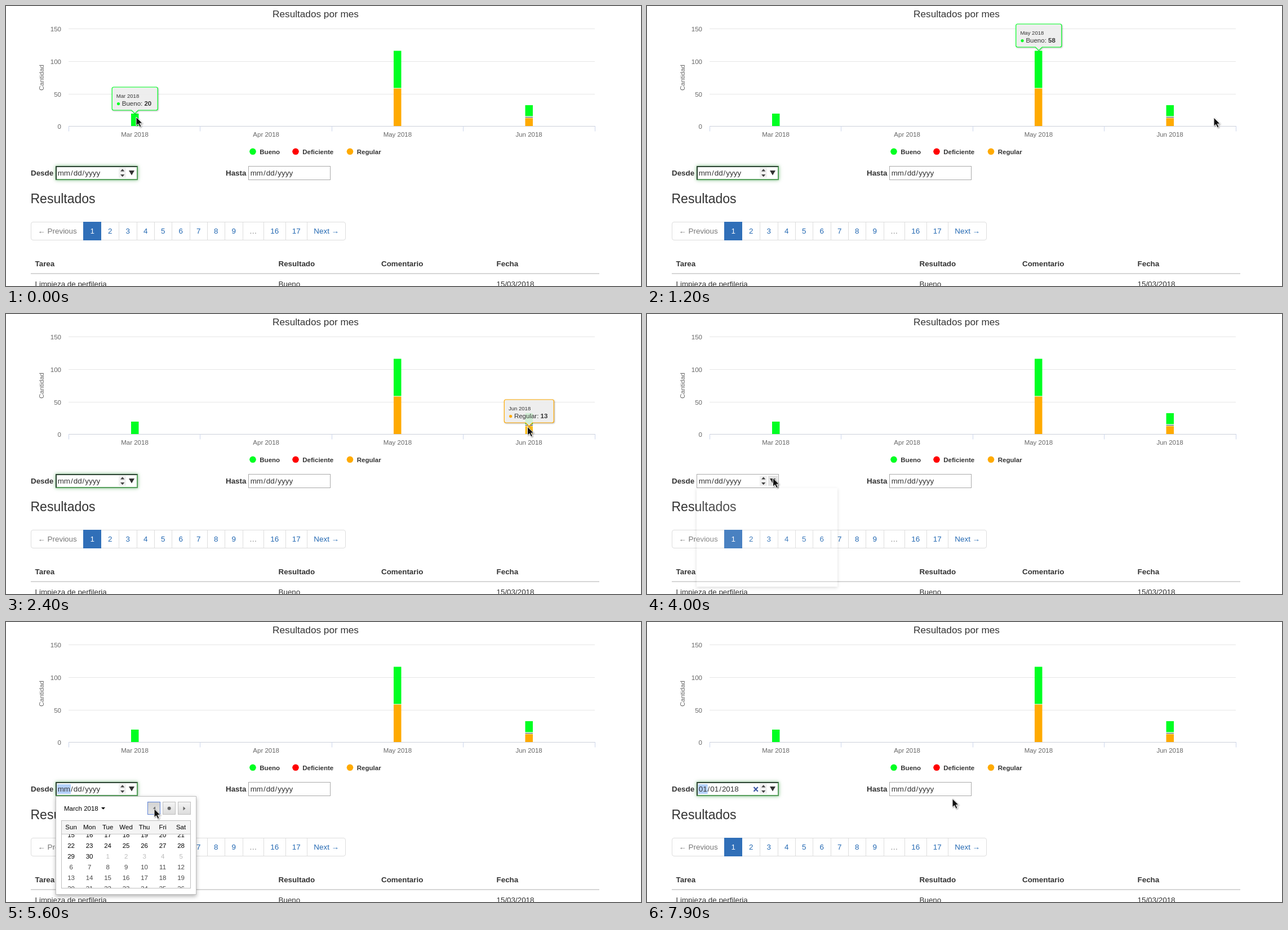
An HTML page for the animation above (8 s loop, 1127 by 497 pixels).

```html
<!DOCTYPE html>
<html lang="es">
<head>
<meta charset="utf-8">
<title>Resultados por mes</title>
<style>
html, body { margin: 0; width: 100%; height: 100%; overflow: hidden; background: #fff; }
svg { position: absolute; left: 0; top: 0; font-family: "Liberation Sans", Arial, sans-serif; }
text { white-space: pre; }
.box { position: absolute; box-sizing: border-box; background: #fff; }
.field { top: 284px; width: 146px; height: 25px; border: 1px solid #a9a9a9; }
.field.on {
  border: 2px solid; border-color: #2c4433 #58a05e #58a05e #2c4433;
  box-shadow: 0 0 6px rgba(50, 150, 60, .65);
}
#pop {
  left: 88px; top: 309px; width: 250px; height: 175px;
  border: 1px solid #bfbfbf; box-shadow: 0 3px 7px rgba(0, 0, 0, .3);
}
#pop.faint { background: rgba(255, 255, 255, .12); border-color: transparent; box-shadow: 0 2px 6px rgba(0, 0, 0, .14); }
#tip { filter: drop-shadow(1px 1px 1px rgba(0, 0, 0, .3)); }
#arrow, #hand { filter: drop-shadow(1px 1px 1px rgba(0, 0, 0, .4)); }
</style>
</head>
<body>
<svg id="page" width="1127" height="497"></svg>
<div class="box field" id="desde" style="left:88px"></div>
<div class="box field" style="left:430px"></div>
<svg id="inputs" width="1127" height="497"></svg>
<div class="box" id="pop"></div>
<svg id="cal" width="1127" height="497">
  <defs>
    <linearGradient id="up" x2="0" y2="1"><stop stop-color="#f4f4f4"/><stop offset="1" stop-color="#dcdcdc"/></linearGradient>
    <linearGradient id="down" x2="0" y2="1"><stop stop-color="#d2d2d2"/><stop offset="1" stop-color="#e6e6e6"/></linearGradient>
    <clipPath id="days"><rect x="99" y="377" width="228" height="95"/></clipPath>
  </defs>
  <g id="calBody"></g>
</svg>
<svg id="top" width="1127" height="497">
  <g id="tip"></g>
  <path id="arrow" d="M0 0V15.4L3.6 12.2L6.3 18L9 16.8L6.4 11.2H11.2Z" fill="#111" stroke="#fff" stroke-width="1" stroke-linejoin="round"/>
  <path id="hand" d="M-1.5 1Q0 -1 1.5 1V8Q3 6.8 4.3 8Q5.8 7 7 8.6Q9.4 8.2 9.4 10.5V15Q9 18 7.5 21H-2Q-3 18.5 -7 13.5Q-8.4 11 -6 10.8Q-4 11.2 -1.5 14Z" fill="#111" stroke="#fff" stroke-linejoin="round"/>
</svg>
<script>
const LOOP = 8000, STEP = 100;
const SMALL = 11.5, BODY = 13.4;
const GREEN = '#00ff22', RED = '#ff0000', ORANGE = '#ffaa00', LINK = '#2469b3';
const $ = id => document.getElementById(id);

function add(parent, tag, attrs, content) {
  const el = document.createElementNS('http://www.w3.org/2000/svg', tag);
  for (const k in attrs) el.setAttribute(k, attrs[k]);
  if (content !== undefined) el.textContent = content;
  return parent.appendChild(el);
}
const rect = (p, x, y, width, height, fill, more) => add(p, 'rect', { x, y, width, height, fill, ...more });
const line = (p, d, stroke, w = 1) => add(p, 'path', { d, stroke, 'stroke-width': w, fill: 'none' });
const shape = (p, d, fill) => add(p, 'path', { d, fill });
const dot = (p, cx, cy, r, fill) => add(p, 'circle', { cx, cy, r, fill });
const text = (p, x, y, s, size = BODY, fill = '#333', more) =>
  add(p, 'text', { x, y, 'font-size': size, fill, ...more }, s);
const MID = { 'text-anchor': 'middle' }, END = { 'text-anchor': 'end' }, BOLD = { 'font-weight': 'bold' };

function drawChart(g) {
  text(g, 549.5, 20, 'Resultados por mes', 17.2, '#333', MID);
  [150, 100, 50, 0].forEach((v, i) => {
    const y = [40.5, 98.5, 156.5, 213.5][i];
    if (v) line(g, `M111 ${y}H1045`, '#e6e6e6');
    text(g, 98, y + 4.3, v, SMALL, '#666', END);
  });
  text(g, 0, 0, 'Cantidad', SMALL, '#666', { ...MID, transform: 'translate(67 127) rotate(-90)' });
  rect(g, 222, 191, 13.5, 22.5, GREEN);
  rect(g, 688, 79.5, 13.5, 66, GREEN);
  rect(g, 688, 146.5, 13.5, 67, ORANGE);
  rect(g, 921.5, 176, 13.5, 19.5, GREEN);
  rect(g, 921.5, 197, 13.5, 1, '#444');
  rect(g, 921.5, 199, 13.5, 14.5, ORANGE, { id: 'regular' });
  line(g, 'M111 213.5H1045', '#ccd0da');
  for (let i = 0; i < 5; i++) line(g, `M${Math.round(111 + i * 233.4) + .5} 213V222.5`, '#ccd6eb');
  ['Mar', 'Apr', 'May', 'Jun'].forEach((m, i) =>
    text(g, 228.5 + i * 233.2, 232.3, m + ' 2018', SMALL, '#666', MID));
  [[438, 'Bueno', GREEN], [514, 'Deficiente', RED], [610.5, 'Regular', ORANGE]].forEach(([x, s, c]) => {
    dot(g, x, 258.3, 5.8, c);
    text(g, x + 12.3, 262.7, s, SMALL, '#333', BOLD);
  });
}

function drawTable(g) {
  text(g, 44, 301, 'Desde', BODY, '#333', BOLD);
  text(g, 390, 301, 'Hasta', BODY, '#333', BOLD);
  text(g, 43.5, 350, 'Resultados', 23, '#333');
  rect(g, 44.5, 383.5, 558, 32, '#fff', { rx: 3.5, stroke: '#ddd' });
  const edges = [137, 169, 200, 232, 263, 294, 326, 357, 388, 420, 457, 496, 534, 603];
  const labels = ['1', '2', '3', '4', '5', '6', '7', '8', '9', '…', '16', '17', 'Next →'];
  text(g, 56.5, 404.3, '← Previous', BODY, '#777');
  labels.forEach((s, i) => {
    const x = edges[i];
    if (!i) rect(g, x, 383, 32, 33, '#306fb8');
    else if (i > 1) line(g, `M${x + .5} 384V415`, '#ddd');
    text(g, (x + edges[i + 1]) / 2 + .2, 404.3, s, BODY, !i ? '#fff' : s === '…' ? '#777' : LINK, MID);
  });
  [[51.5, 'Tarea', 'Limpieza de perfileria'], [483.5, 'Resultado', 'Bueno'], [666, 'Comentario', ''], [870.5, 'Fecha', '15/03/2018']]
    .forEach(([x, head, cell]) => {
      text(g, x, 462, head, BODY, '#333', BOLD);
      text(g, x, 498, cell);
    });
  line(g, 'M44 475H1053', '#d6d6d6', 2);
}

function drawDate(g, x, picked, selected) {
  const parts = picked ? ['01', '01', '2018'] : ['mm', 'dd', 'yyyy'];
  const widths = picked ? [14.9, 14.9] : [22.3, 14.9];
  if (selected) rect(g, x - 1, 288, widths[0] + 2, 17, '#b4d1fb');
  parts.forEach((s, i) => {
    text(g, x, 301, s);
    if (i < 2) {
      text(g, x + widths[i] + 1, 301, '/');
      x += widths[i] + 5.7;
    }
  });
}

function drawInputs(g, t) {
  g.replaceChildren();
  const picked = t >= 7300;
  drawDate(g, 91.7, picked, t >= 4300);
  drawDate(g, 433.7, false, false);
  rect(g, 200, 287, 13, 18, '#f0f0f0');
  if (t >= 4000 && t < 4600) rect(g, 215, 287, 17, 18, '#e4e4e4');
  shape(g, 'M203 293.5H210.4L206.7 289.2Z', '#444');
  shape(g, 'M203 299H210.4L206.7 303.3Z', '#444');
  shape(g, 'M218 292H228L223 300.5Z', '#333');
  if (picked) line(g, 'M189.5 293L196.8 300.8M196.8 293L189.5 300.8', '#3f5aa5', 2.2);
}

const day = (m, d) => Date.UTC(2018, m, d);
// start time, title, first visible Sunday, centre of the first row, month, start of the fading days
const MONTHS = [
  [4300, 'June 2018', day(4, 27), 386, 5],
  [5300, 'May 2018', day(3, 29), 378, 4, day(5, 1)],
  [5600, 'March 2018', day(3, 15), 378, 3, day(4, 6)],
  [6200, 'January 2018', day(0, 0), 386, 0]
];
const colX = i => 115.6 + i * 32.5;

function drawCalendar(g, t) {
  g.replaceChildren();
  if (t < 4300 || t >= 7300) return;
  const [, title, first, y0, month, fade = Infinity] = at(MONTHS, t);
  const label = text(g, 103, 334.5, title, SMALL, '#000');
  const ax = 103 + label.getComputedTextLength() + 5.3;
  shape(g, `M${ax} 329h7l-3.5 3.8Z`, '#000');

  const pressed = t >= 5300 && t < 6200;
  [251.5, 278.5, 305.5].forEach((x, i) => rect(g, x, 319.5, 22, 22, !i && pressed ? 'url(#down)' : 'url(#up)',
    { stroke: !i && t >= 5300 ? '#5f84d8' : !i && t >= 4900 ? '#999' : '#bfbfbf' }));
  shape(g, 'M265 327.5V334.5L261 331Z', '#666');
  dot(g, 289.6, 330.8, 3, '#666');
  shape(g, 'M314.5 327.5V334.5L318.5 331Z', '#666');

  rect(g, 99, 352, 228, 25, '#f4f4f4');
  line(g, 'M99 376.5H327', '#c8c8c8');
  ['Sun', 'Mon', 'Tue', 'Wed', 'Thu', 'Fri', 'Sat'].forEach((s, i) => text(g, colX(i), 368, s, SMALL, '#000', MID));

  const grid = add(g, 'g', { 'clip-path': 'url(#days)' });
  if (t >= 6900) rect(grid, 132, 377, 32, 19, '#e4eaee');
  for (let i = 0; i < 42; i++) {
    const time = first + i * 864e5, date = new Date(time);
    const color = date.getUTCMonth() === month ? '#000' : time >= fade ? '#484848' : '#bbb';
    text(grid, colX(i % 7), y0 + 4.2 + 19 * Math.floor(i / 7), date.getUTCDate(), SMALL, color, MID);
  }
  rect(g, 98.5, 352.5, 229, 120, 'none', { stroke: t < 5300 ? '#5f84d8' : '#bfbfbf' });
}

// start time, month, series, value, centre, top, opacity
const TIPS = [
  [0, 'Mar', 'Bueno', 20, 228.7, 144, 1],
  [600, 'Mar', 'Bueno', 20, 228.7, 144, .5],
  [700, 'May', 'Bueno', 58, 695.3, 32, 1],
  [1400, 'May', 'Bueno', 58, 695.3, 32, .5],
  [1500],
  [2000, 'Jun', 'Bueno', 18, 928.3, 129, 1],
  [2200, 'Jun', 'Regular', 13, 928.3, 142, 1],
  [2300, 'Jun', 'Regular', 13, 928.3, 149, 1],
  [2400, 'Jun', 'Regular', 13, 928.3, 152, 1],
  [4000]
];

function drawTip(g, t) {
  g.replaceChildren();
  const [, month, series, n, cx, y, opacity] = at(TIPS, t);
  $('regular').setAttribute('fill', series === 'Regular' ? '#ffbd1a' : ORANGE);
  if (!month) return;
  const color = series === 'Bueno' ? GREEN : ORANGE, w = series === 'Bueno' ? 81 : 88;
  const x = cx - w / 2, b = y + 41;
  g.setAttribute('opacity', opacity);
  add(g, 'path', {
    d: `M${x + 3} ${y}H${x + w - 3}q3 0 3 3V${b - 3}q0 3 -3 3H${cx + 6}L${cx} ${b + 6}L${cx - 6} ${b}H${x + 3}q-3 0 -3 -3V${y + 3}q0 -3 3 -3Z`,
    fill: '#f7f7f7', 'fill-opacity': .85, stroke: color, 'stroke-width': 1.2
  });
  text(g, x + 7.6, y + 18.5, month + ' 2018', 9.57);
  dot(g, x + 11.3, y + 29.6, 2.6, color);
  const row = text(g, x + 17.6, y + 33, series + ': ', SMALL);
  add(row, 'tspan', BOLD, n);
}

const GLIDE = [[0, 231, 197], [700, 692, 112], [900, 705, 122], [1200, 1006, 198], [1300, 1014, 197],
  [1800, 964, 197], [2000, 931, 187], [2400, 925.5, 200]];
const STOPS = [[2400, 925.5, 200], [4000, 223.5, 291], [4600, 271, 350], [4900, 263, 331.5], [6600, 200.5, 371],
  [6900, 152.5, 377.5], [7300, 152, 381], [7600, 732, 258], [7900, 542, 313.5]];

function at(table, t) {
  return table.filter(r => r[0] <= t).pop();
}

function cursor(t) {
  if (t >= 2400) return at(STOPS, t).slice(1);
  const a = at(GLIDE, t), b = GLIDE[GLIDE.indexOf(a) + 1];
  const u = (t - a[0]) / (b[0] - a[0]), e = u * u * (3 - 2 * u);
  return [a[1] + (b[1] - a[1]) * e, a[2] + (b[2] - a[2]) * e];
}

function render(t) {
  $('desde').classList.toggle('on', t < 4000 || t >= 4300);
  $('pop').style.display = t >= 4000 && t < 7300 ? '' : 'none';
  $('pop').classList.toggle('faint', t < 4300);
  drawInputs($('inputs'), t);
  drawCalendar($('calBody'), t);
  drawTip($('tip'), t);
  const overLink = t >= 7300 && t < 7600;
  $('arrow').style.display = overLink ? 'none' : '';
  $('hand').style.display = overLink ? '' : 'none';
  for (const id of ['arrow', 'hand']) $(id).setAttribute('transform', `translate(${cursor(t)})`);
}

drawChart($('page'));
drawTable($('page'));
let last = -1;
function tick() {
  const t = Math.floor(performance.now() % LOOP / STEP) * STEP;
  if (t !== last) render(last = t);
  requestAnimationFrame(tick);
}
tick();
</script>
</body>
</html>
```
